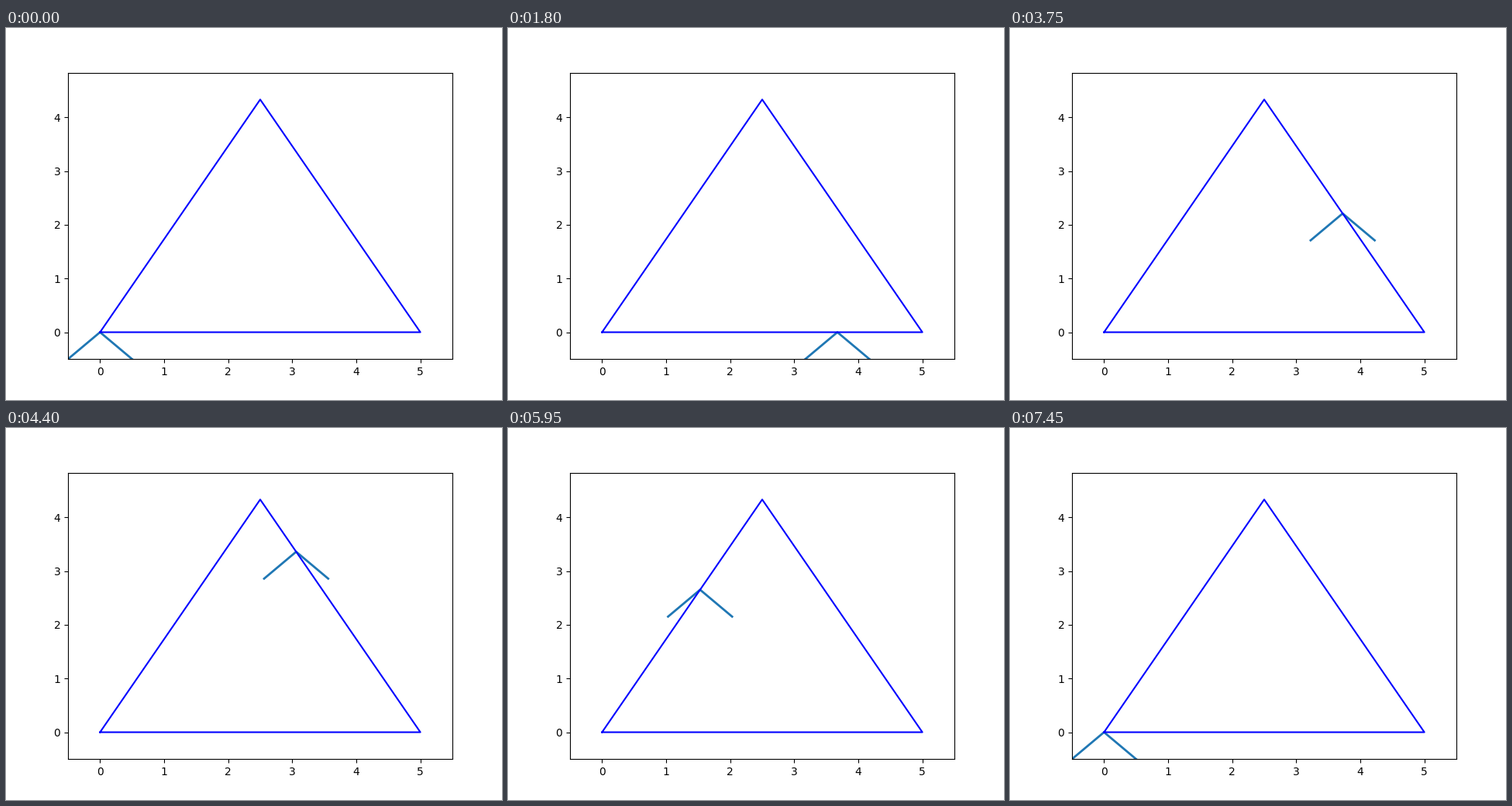
Write a matplotlib script that moves like this. It is 640x480 px and loops after 7.5 s.

```python
import matplotlib.pyplot as plt
import numpy as np
from matplotlib.animation import FuncAnimation

SIDE = 5
STEPS = 50
HEIGHT = SIDE * np.sqrt(3) / 2

corners = np.array([(0, 0), (SIDE, 0), (SIDE / 2, HEIGHT), (0, 0)])
wedge_x = np.array([-0.5, 0, 0.5])
wedge_y = np.array([-0.5, 0, -0.5])

fig, ax = plt.subplots(figsize=(6.4, 4.8), dpi=100)
ax.set_xlim(-0.5, SIDE + 0.5)
ax.set_ylim(-0.5, HEIGHT + 0.5)

wedge, = ax.plot(wedge_x, wedge_y, color="tab:blue", lw=2)
ax.plot(corners[:, 0], corners[:, 1], "b-", lw=1.5)


def update(frame):
    # Each side is walked end to end, so the wedge rests a step at every corner.
    side, step = divmod(frame, STEPS)
    start, end = corners[side], corners[side + 1]
    x, y = start + (end - start) * step / (STEPS - 1)
    wedge.set_data(wedge_x + x, wedge_y + y)
    return wedge,


anim = FuncAnimation(fig, update, frames=3 * STEPS, interval=50,
                     repeat=True, repeat_delay=0)
plt.show()
```
